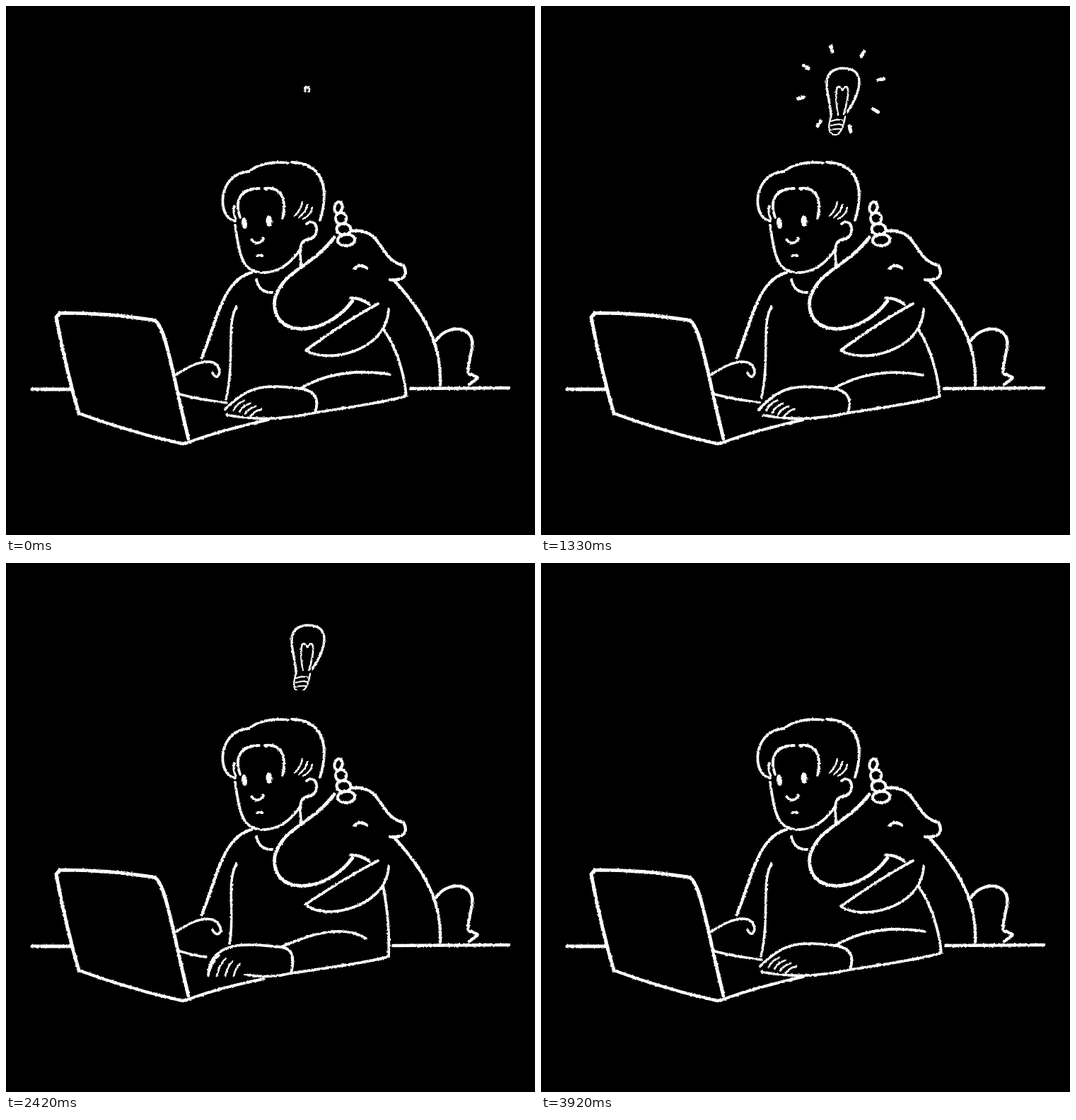
Write an HTML page that moves like this. It is 748 px wide and 748 px high and loops after 4000 ms.

```html
<!DOCTYPE html>
<html lang="en">
<head>
<meta charset="utf-8">
<title>Bright idea at the desk</title>
<style>
  html, body { margin: 0; width: 100%; height: 100%; overflow: hidden; background: #000; }
  svg { display: block; width: 100vw; height: 100vh; }
</style>
</head>
<body>
<svg viewBox="0 0 748 748" fill="none" stroke="#fff" stroke-linecap="round" stroke-linejoin="round">
  <defs>
    <filter id="chalk" filterUnits="userSpaceOnUse" x="0" y="0" width="748" height="748" color-interpolation-filters="sRGB">
      <feTurbulence type="fractalNoise" baseFrequency="0.35" numOctaves="2" seed="4" result="n"/>
      <feDisplacementMap in="SourceGraphic" in2="n" scale="3" xChannelSelector="R" yChannelSelector="G"/>
    </filter>
    <clipPath id="baseClip"><rect id="baseRect" x="380" y="60" width="90" height="0"/></clipPath>
    <clipPath id="wireClip"><rect id="wireRect" x="380" y="60" width="90" height="0"/></clipPath>
  </defs>
  <g filter="url(#chalk)">
    <g id="still"></g>
    <g id="arm"></g>
    <g id="jaw"></g>
    <g id="glass"></g>
    <g clip-path="url(#wireClip)"><g id="wire"></g></g>
    <g id="base" clip-path="url(#baseClip)"></g>
    <g id="rays"></g>
  </g>
</svg>
<script>
const $ = id => document.getElementById(id);
const mix = (a, b, t) => a + (b - a) * t;
const clamp = x => Math.max(0, Math.min(1, x));
const times = (n, fn) => Array.from({ length: n }, (_, i) => fn(i)).join('');

// Line, quadratic or cubic, depending on how many points follow the start
const bez = (start, ...rest) => `M${start}${' LQC'[rest.length]}${rest.join(' ')}`;
const pen = (width, ...d) =>
  `<path vector-effect="non-scaling-stroke" stroke-width="${width}" d="${d.join('')}"/>`;
const oval = (x, y, rx, ry, turn, style) =>
  `<ellipse rx="${rx}" ry="${ry}" transform="translate(${x} ${y}) rotate(${turn})" ${style}/>`;
const eye = (x, y, rx) => oval(x, y, rx, 8, -5, 'fill="#fff" stroke="none"');

const laptop = () =>
  pen(5, bez([103, 576], [85, 515], [71, 440]), 'L76,434',
    bez([76, 434], [145, 434], [208, 444]),
    bez([208, 444], [225, 446], [235, 520], [258, 612])) +
  pen(4.4, bez([103, 576], [180, 604], [250, 619]), 'L258,617');

const hair = () =>
  pen(3.8,
    bez([343, 234], [298, 238], [298, 300], [324, 304]),
    bez([346, 232], [367, 218], [399, 222]),
    bez([404, 221], [442, 222], [460, 250], [444, 303]),
    bez([331, 299], [322, 272], [334, 258], [358, 258]),
    bez([366, 258], [394, 255], [396, 280], [391, 300])) +
  pen(3, bez([323, 283], [320, 292], [325, 301])) +
  times(3, i => pen(2.4, bez([419 + 7 * i, 277 + 4 * i], [417 + 7 * i, 288 + 4 * i], [408 + 6 * i, 297 + 2 * i])));

const face = () =>
  pen(3.8,
    bez([324, 310], [330, 355], [335, 378], [365, 377]),
    bez([365, 377], [395, 376], [416, 344]),
    bez([425, 308], [438, 298], [446, 320], [432, 329]),
    bez([432, 329], [412, 330], [416, 344], [417, 367]),
    bez([347, 330], [355, 341], [364, 329]),
    bez([355, 353], [362, 353]),
    bez([354, 387], [359, 406], [376, 405])) +
  eye(337, 307, 4) + eye(372, 304, 4.5);

const unicorn = () =>
  times(4, i => oval(470 + 3.7 * i, 285 + 15.3 * i, 5.5 + 2.2 * i, 8, 12 - 5 * i, 'stroke-width="4"')) +
  pen(4.8,
    bez([464, 327], [430, 372], [392, 372], [380, 415]),
    bez([380, 415], [374, 470], [450, 470], [490, 417])) +
  pen(4.3,
    bez([487, 413], [500, 412], [514, 422]),
    bez([489, 318], [535, 314], [525, 358], [562, 367]),
    bez([562, 367], [570, 382], [560, 389], [543, 387]),
    bez([493, 371], [501, 363], [510, 371]),
    bez([549, 388], [582, 425], [617, 470], [614, 536]),
    bez([608, 473], [625, 448], [664, 452], [659, 483]),
    bez([659, 483], [648, 538], [654, 512], [667, 526]), 'L655,535');

$('still').innerHTML = laptop() + hair() + face() + unicorn() +
  pen(4.2, bez([347, 377], [305, 388], [297, 450], [277, 497])) +
  pen(5, bez([37, 542], [93, 542]));

$('glass').innerHTML = pen(3.4,
  bez([410, 156], [410, 128], [389, 92], [425, 88]),
  bez([425, 88], [462, 87], [452, 122], [433, 150]));
$('wire').innerHTML = pen(2.6,
  bez([420, 154], [415, 125], [417, 104], [426, 119]),
  bez([426, 119], [436, 105], [437, 124], [428, 153]));
$('base').innerHTML =
  pen(2.4, bez([410, 157], [402, 182], [417, 182]), bez([417, 182], [426, 180], [430, 157])) +
  times(3, i => pen(2, bez([410, 163 + 6 * i], [419, 159 + 7 * i], [429 - 2 * i, 162 + 6 * i])));

// s = 0: hand resting, s = 1: hand drawn in and typing
function drawArm(k) {
  const bump = (at, size) => size * Math.cos(Math.PI / 2 * Math.min(1, Math.abs(k - at) / 5)) ** 2;
  const s = Math.max(bump(12, .2), bump(20, .97), bump(29, 1));
  const tap = s * (k % 2 ? 0 : 2);
  const at = (x0, y0, x1, y1) => [mix(x0, x1, s), mix(y0, y1, s)];
  const elbow = at(566, 551, 541, 556);
  const wrist = at(416, 541, 389, 543);
  const cuff = at(437, 575, 403, 580);
  const finger = i => {
    const tip = at(322 + 8 * i, 571 + 3 * i, 286 + 12 * i, 584);
    const knuckle = at(337 + 8 * i, 558 + 4 * i, 301 + 10 * i, 555 + 4 * i);
    tip[1] += i % 2 ? tap : -tap;
    return pen(2.8, bez(tip, [mix(tip[0], knuckle[0], .3), mix(tip[1], knuckle[1], .7)], knuckle));
  };
  $('arm').innerHTML =
    pen(3.8,
      bez([533, 456], at(560, 495, 543, 505), elbow),
      bez(elbow, at(550, 558, 530, 562), cuff),
      bez(wrist, at(470, 509, 471, 506), at(543, 521, 509, 531)),
      bez(wrist, at(447, 545, 412, 545), cuff),
      bez(wrist, at(360, 533, 340, 538), at(340, 540, 290, 533), at(310, 570, 286, 582)),
      bez(at(312, 578, 338, 582), at(370, 590, 370, 588), cuff)) +
    times(4, finger) +
    pen(3.5,
      bez([241, 521], [275, 498], [300, 497], at(302, 518, 304, 520)),
      bez(at(302, 518, 304, 520), [299, 530], [292, 519]),
      bez([246, 549], [270, 556], at(312, 561, 283, 557)),
      bez([326, 425], [311, 450], [324, 500], at(311, 556, 316, 538))) +
    pen(4, bez([258, 617], [300, 601], at(371, 585, 365, 588))) +
    pen(4.4, bez(at(572, 541, 547, 541), [711, 540]));
}

function drawJaw(k) {
  const lift = (1 - Math.cos(2 * Math.PI * (k - 2) / 16)) / 2;
  const tip = [424, 488 - 8 * lift];
  $('jaw').innerHTML = pen(3.8,
    bez(tip, [480, 446 - 2 * lift], [526, 421]),
    bez(tip, [mix(455, 440, lift), 506], [538, 490], [541, 429]));
}

const zoom = (id, x, y, sx, sy = sx) =>
  $(id).setAttribute('transform', `translate(${x} ${y}) scale(${sx} ${sy}) translate(${-x} ${-y})`);
const show = (id, on) => $(id).setAttribute('display', on ? 'inline' : 'none');

function drawBulb(k) {
  const size = Math.min(clamp(k / 5), clamp((37 - k) / 4));
  const fill = Math.min(clamp((k - 5) / 3), clamp((33 - k) / 5));
  const glow = Math.min(clamp((k - 8) / 2), clamp((29 - k) / 3));
  show('glass', size > 0);
  show('wire', k < 37);
  show('base', fill > 0);
  zoom('glass', 426, 106, size, size * (.6 + .4 * size));
  zoom('wire', 426, 114, Math.max(.35, size));
  $('baseRect').setAttribute('height', 96 + 30 * fill);
  $('wireRect').setAttribute('height', 62 + 38 * fill);

  $('rays').innerHTML = glow && times(8, i => {
    const a = (45 * i - 103) * Math.PI / 180;
    const on = r => [424 + r * Math.cos(a), 117 + r * Math.sin(a)];
    return pen(5, bez(on(58 - 4 * glow), on(58 + 4 * glow)));
  }) || '';
}

// Drawn on twelves: 48 poses per loop, start times rounded to 10 ms
const LOOP = 4000, COUNT = 48;
function frameAt(ms) {
  let k = Math.min(COUNT - 1, Math.floor(ms * COUNT / LOOP) + 1);
  while (Math.round(k * 25 / 3) * 10 > ms) k--;
  return k;
}

let last = -1;
function tick() {
  const k = frameAt(performance.now() % LOOP);
  if (k !== last) {
    drawArm(k);
    drawJaw(k);
    drawBulb(k);
    last = k;
  }
  requestAnimationFrame(tick);
}
tick();
</script>
</body>
</html>
```
